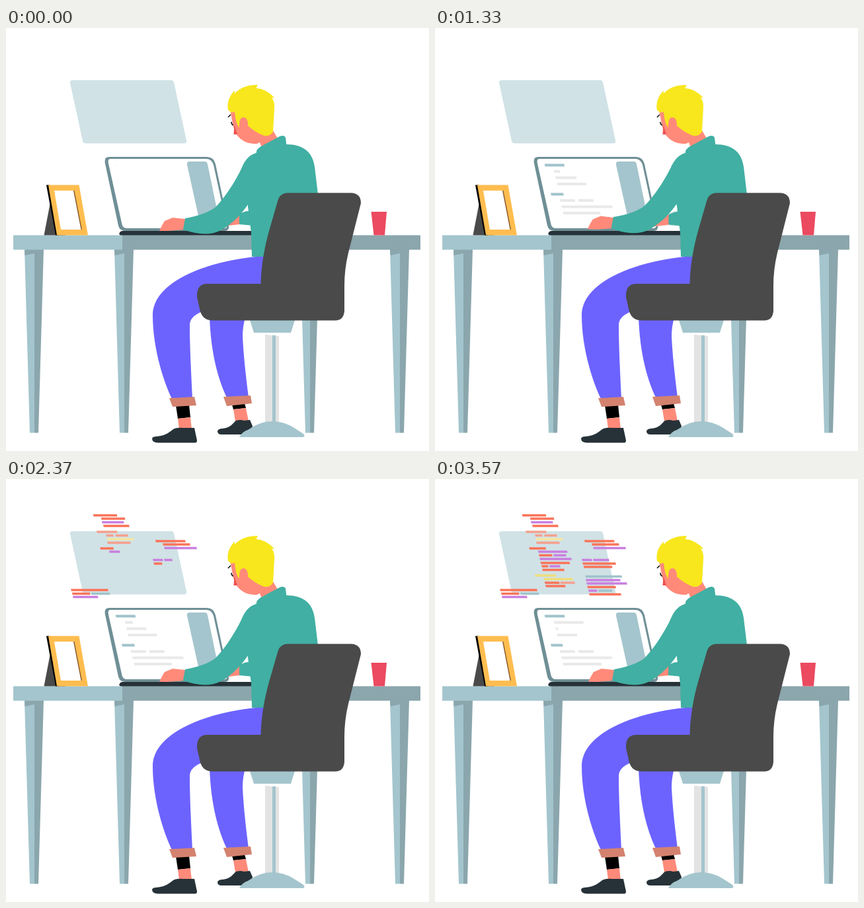
Write an HTML page without scripts that moves like this. It is 640 px wide and 640 px high and loops after 3.6 s.

```html
<!DOCTYPE html>
<html lang="en">
<head>
<meta charset="utf-8">
<title>Coding at a desk</title>
<style>
@property --t { syntax: "<number>"; inherits: true; initial-value: 0; }
@property --n { syntax: "<integer>"; inherits: false; initial-value: 0; }

html, body { margin: 0; height: 100%; overflow: hidden; background: #fff; }
svg { display: block; width: 100%; height: 100%; animation: clock 3.6s linear infinite; }
@keyframes clock { from { --t: 0; } to { --t: 3.6; } }

.light { fill: #a4c5cd; }
.shade { fill: #8ba6ad; }
.grey { fill: #4a4a4a; }
.dark { fill: #263238; }
.skin { fill: #ff8a7a; }
.shirt { fill: #41afa3; }
.pants { fill: #6c63ff; }
.cuff { fill: #d4826f; }

.typed rect, .code rect { transform-box: fill-box; transform-origin: left; }

/* Screen lines: type on, hold, wipe off, again every 1.03 s after delay --d */
.typed rect {
  height: 4px;
  fill: #e9e9e9;
  --x: calc((var(--t) - var(--d)) / 1.03);
  --n: calc(var(--x) - .5);
  --p: (var(--x) - var(--n));
  --a: max(0, 1 - var(--p) / .33);
  --b: max(0, var(--p) * 2 - 1);
  transform: scaleX(calc(clamp(0, var(--x) * 1000, 1) * (1 - var(--a) * var(--a) - var(--b) * var(--b))));
}
.typed .head { fill: #a0c3cb; }

/* Floating code: row --i of a block starts at --s + --i * --k and stays */
.code { --w: .22; }
.code rect {
  height: 3.5px;
  transform: scaleX(clamp(0, (var(--t) - var(--s) - var(--i) * var(--k)) / var(--w), 1));
}
.code .half { --w: .11; }
.o { fill: #fa7359; }
.p { fill: #c97fe0; }
.l { fill: #f5a08e; }
.c { fill: #f4e6a2; }
.y { fill: #eedd7c; }
.b { fill: #a0c3cb; }

.arm, .hand, .far, .face { animation: .6s cubic-bezier(.4, 0, .6, 1) infinite alternate; }
.arm { animation-name: arm; }
.hand { animation-name: hand; }
.far { animation-name: far; }
.face { animation-name: nod; transform-origin: 390px 170px; }
@keyframes arm {
  from { d: path("M383 188C370 190 362 198 356 213C346 234 330 258 317 271Q303 282 271 288L268 305C290 313 310 314 325 306C345 295 358 279 366 267L385 240Z"); }
  to { d: path("M383 188C370 190 362 204 356 211C344 226 330 241 318 252Q298 270 259 269L254 287C275 300 305 302 322 293C340 283 354 268 364 258L385 240Z"); }
}
@keyframes hand {
  from { d: path("M232 307Q236 298 240 292L252 287L272 289L269 305L245 307Z"); }
  to { d: path("M219 281Q224 274 228 268L240 263.5L261 269L255 287L238 284Z"); }
}
@keyframes far { from { transform: translate(-4px, -7px); } to { transform: none; } }
@keyframes nod { to { transform: rotate(-1.6deg); } }
</style>
</head>
<body>
<svg viewBox="0 0 640 640">
  <defs>
    <g id="leg">
      <path class="light" d="M28 335H43V612.5H36Z"/>
      <path class="shade" d="M43 335H57L49 612.5H43ZM28 335H43V341L28.500 344Z"/>
    </g>
  </defs>

  <!-- floating panel and code -->
  <path fill="#d0e2e6" d="M101 79H250Q253 79 254 82L273 170Q274 174.500 270 174.500H121Q117 174.500 116 171L97 83Q96 79 101 79Z"/>
  <g class="code" transform="translate(0 -1.750) skewX(12)">
    <g style="--s:1.435;--k:.095">
      <rect class="o" x="120" y="55" width="36" style="--i:0"/>
      <rect class="o" x="131" y="60" width="36" style="--i:1"/>
      <rect class="p" x="131" y="65.500" width="33" style="--i:2"/>
      <rect class="o" x="132" y="71" width="39" style="--i:3"/>
      <rect class="l" x="120" y="80" width="31" style="--i:4"/>
      <rect class="l half" x="133" y="85.500" width="11" style="--i:5"/>
      <rect class="l half" x="147" y="85.500" width="19" style="--i:6"/>
      <rect class="c" x="133" y="91" width="41" style="--i:6"/>
      <rect class="l" x="132.500" y="96.500" width="35" style="--i:7"/>
      <rect class="o" x="120" y="105" width="25" style="--i:8"/>
      <rect class="p" x="132.500" y="110" width="44" style="--i:9"/>
      <rect class="o half" x="132.500" y="115.500" width="20" style="--i:10"/>
      <rect class="p half" x="154.500" y="115.500" width="19" style="--i:11"/>
      <rect class="p" x="132.500" y="121" width="48" style="--i:11"/>
      <rect class="o" x="132.500" y="127" width="44" style="--i:12"/>
      <rect class="o half" x="133" y="132" width="10" style="--i:13"/>
      <rect class="p half" x="145" y="132" width="16" style="--i:14"/>
      <rect class="o" x="133" y="137.500" width="33" style="--i:14"/>
      <rect class="y" x="120" y="146" width="32" style="--i:15"/>
      <rect class="y" x="132" y="151.500" width="44" style="--i:16"/>
      <rect class="o half" x="132.500" y="157" width="22" style="--i:17"/>
      <rect class="l half" x="156" y="157" width="22" style="--i:18"/>
      <rect class="o" x="132.500" y="162" width="30" style="--i:18"/>
    </g>
    <g style="--s:1.85;--k:.065">
      <rect class="o" x="206" y="94" width="45" style="--i:0"/>
      <rect class="o" x="216" y="99" width="41" style="--i:1"/>
      <rect class="p" x="217" y="104.500" width="49" style="--i:2"/>
    </g>
    <g style="--s:2.25;--k:.065">
      <rect class="p half" x="196" y="122.500" width="15" style="--i:0"/>
      <rect class="p half" x="213" y="122.500" width="24" style="--i:1"/>
      <rect class="o" x="196" y="128" width="50" style="--i:1"/>
      <rect class="o" x="196.500" y="133" width="43" style="--i:2"/>
    </g>
    <g style="--s:2.49;--k:.082">
      <rect class="b" x="196" y="147.500" width="55" style="--i:0"/>
      <rect class="p" x="195.500" y="153" width="52" style="--i:1"/>
      <rect class="p" x="195.500" y="158" width="61" style="--i:2"/>
      <rect class="o" x="195.500" y="163.500" width="43" style="--i:3"/>
      <rect class="p half" x="196" y="169" width="13" style="--i:4"/>
      <rect class="b half" x="211" y="169" width="21" style="--i:5"/>
      <rect class="o" x="196" y="174.500" width="48" style="--i:5"/>
    </g>
    <g style="--s:1.79;--k:.095">
      <rect class="o" x="62.500" y="168" width="56" style="--i:0"/>
      <rect class="o half" x="63" y="173.500" width="27" style="--i:1"/>
      <rect class="b half" x="92" y="173.500" width="28" style="--i:2"/>
      <rect class="p" x="63" y="178.500" width="38" style="--i:2"/>
    </g>
  </g>

  <!-- laptop -->
  <path fill="#6f8f96" d="M156 195H304Q314 195 317 206L337 300Q338 307 330 307H181Q172 307 170 299L150 205Q148 195 156 195Z"/>
  <path fill="#fff" d="M158 198H303Q311 198 314 207L334 299Q335 303 330 303H183Q177 303 175.500 297L155 205Q153.500 198 158 198Z"/>
  <path class="light" d="M278 202H301Q304 202 305 206L323 293Q324 297 320 297H298Q294 297 293 293L274 207Q273 202 278 202Z"/>
  <g class="typed" transform="skewX(12)">
    <rect class="head" x="122" y="205.500" width="30" style="--d:0"/>
    <rect x="134" y="215" width="52" style="--d:.27"/>
    <rect x="134.500" y="224.500" width="57" style="--d:.47"/>
    <rect x="134.500" y="234" width="47" style="--d:.69"/>
    <rect class="head" x="122" y="249.500" width="19" style="--d:.86"/>
    <rect x="133.500" y="259" width="23" style="--d:.95"/>
    <rect x="161.500" y="259" width="23" style="--d:1.03"/>
    <rect x="134" y="268.500" width="77" style="--d:.95"/>
    <rect x="134.500" y="278" width="58" style="--d:1.05"/>
  </g>
  <path class="dark" d="M176 307H380V314H174Q170 313 172 309.500Q173 307 176 307Z"/>

  <!-- desk -->
  <use href="#leg"/>
  <use href="#leg" x="136"/>
  <use href="#leg" x="417"/>
  <use href="#leg" x="553"/>
  <path class="light" d="M11 313.500H176V335.500H11Z"/>
  <path class="shade" d="M176 313.500H627V335.500H176Z"/>
  <path class="grey" d="M67 264L57.500 313.500H90Z"/>
  <path d="M61 237.500H66L80 313.500H75Z"/>
  <path fill="#ffbd4f" d="M64 237.500H110.500L124 313.500H77Z"/>
  <path fill="#8a5a2b" d="M100 246H103.500L115 305H112Z"/>
  <path fill="#fff" d="M73 246H102L113.500 305H83Z"/>
  <path fill="#eb4a60" d="M552.500 278H576L573 313.500H556.500Z"/>

  <!-- feet and legs -->
  <path d="M257 571L277 570L279 589L260 591ZM342 570L361 568L363 575L344 577Z"/>
  <path class="skin" d="M260 591L279 589L281 607H262ZM344 577L363 575L367 595H347Z"/>
  <path class="dark" d="M285 605L289 624Q289 627.500 286 627.500H230Q221 627 221 621Q222 618 228 618C243 617 248 610 255 606Q262 604 268 605ZM369 593L373 602L370 615H326Q320 615 320 610Q321 606 328 606C340 605 343 598 348 594Q355 592 360 594Z"/>
  <path class="pants" d="M308 438C310 490 320 530 334 559H367C362 520 359 490 358 466Q358 452 362 438Z"/>
  <path class="pants" d="M392 345C330 348 222 375 222 435C222 480 236 530 251 561H282C280 520 278 480 278 448Q279 436 297 429L400 420Z"/>
  <path class="cuff" d="M247 560L285 558L288 571L252 573ZM329 558L370 556L372 568L334 572Z"/>

  <!-- far arm, head, torso, near arm -->
  <g class="far">
    <path class="skin" d="M327 307L330 297L343 287L358 289V304L340 306Z"/>
    <path class="shirt" d="M357 288L366 284.500L378 283V306L357 304Z"/>
  </g>
  <g class="face">
    <path class="skin" d="M382 168L404 155L411 167L387 181Z"/>
    <path class="skin" d="M339 124L344 150L350 163Q362 177 380 175L392 169L394 150L360 122Z"/>
    <path fill="#f0514f" d="M345.500 147L344.500 161H350Z"/>
    <path d="M336 135L340 131M341 142Q341 146 344 147" fill="none" stroke="#111" stroke-width="1.600"/>
    <path fill="#f8e71c" d="M336 124Q333 108 346 94.500L346 99Q358 86 381 86L378.500 91Q394 92 406.500 106L402 105Q407 112 406 122L404 157Q398 166 388 162Q376 157 365 147L354 152Q348 147 346 127L341 128Z"/>
    <path class="skin" d="M353 146Q353 135 359.500 135Q366 136 366 146L364 158H355Q352 153 353 146Z"/>
  </g>
  <path class="shirt" d="M378 190Q398 174 424 176C450 176 464 188 467 210L473 260L400 346H372L371 310L365 262L362 215Q366 197 378 190Z"/>
  <path class="shirt" d="M379 192Q377 184 386 179L413 164.500Q421 161 423 166L424.500 178Z"/>
  <path class="skin hand" d="M232 307Q236 298 240 292L252 287L272 289L269 305L245 307Z"/>
  <path class="shirt arm" d="M383 188C370 190 362 198 356 213C346 234 330 258 317 271Q303 282 271 288L268 305C290 313 310 314 325 306C345 295 358 279 366 267L385 240Z"/>

  <!-- chair -->
  <path fill="#e3e3e3" d="M392 464L413 466V598H392Z"/>
  <path class="light" d="M403 465H408V598H403Z"/>
  <path class="light" d="M353 619Q357 611 366 608Q384 595 403 595Q420 595 436 605L450 614Q454 619 448 619H355Z"/>
  <path class="light" d="M369 442H437L431 461H375Z"/>
  <path class="grey" d="M426 249.500H522Q537 250 537 265L518 340Q512 365 512 390V428Q511 442.500 498 442.500H312Q296 442 293 425L289 407Q288 387 305 387H385.500C386 360 391 332 398 307L411 262Q414 250 426 249.500Z"/>
</svg>
</body>
</html>
```
